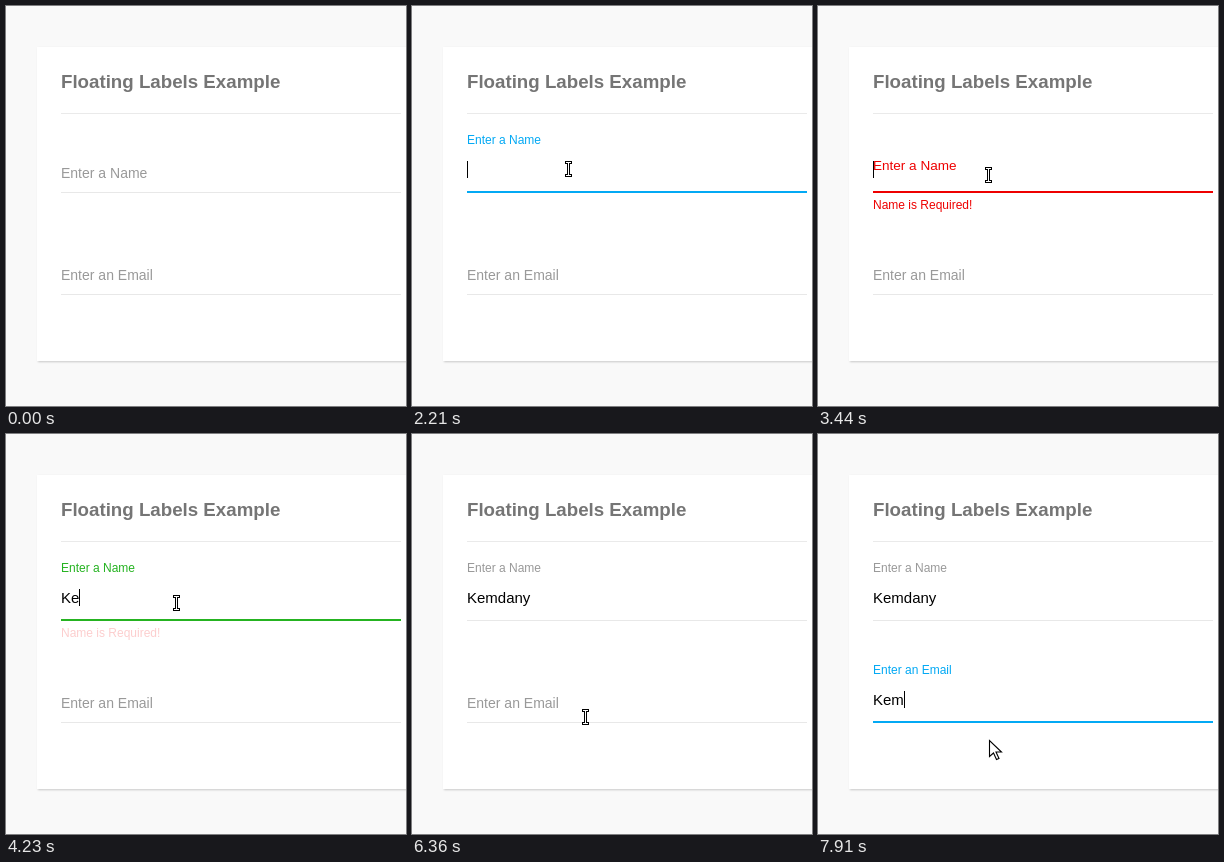
Animation, 400 px wide and 400 px high, one loop 8 s. Source, as an HTML page with a canvas:

```html
<!DOCTYPE html>
<html lang="en">
<head>
<meta charset="utf-8">
<title>Floating labels</title>
<style>
  html, body { margin: 0; width: 100%; height: 100%; overflow: hidden; background: #f9f9f9; }
  canvas { display: block; width: 400px; height: 400px; }
</style>
</head>
<body>
<canvas id="stage" width="400" height="400"></canvas>
<script>
const ctx = document.getElementById('stage').getContext('2d', { alpha: false });
const LOOP = 8000, TRANSITION = 240, BLINK = 550;
const FONT = '"Liberation Sans", Arial, sans-serif';
const LEFT = 55, WIDTH = 340;

const GREY = [153, 153, 153], BLUE = [3, 169, 244], RED = [238, 0, 0], GREEN = [34, 182, 34];

const clamp = v => Math.max(0, Math.min(1, v));
const lerp = (a, b, k) => a + (b - a) * k;
const mix = (from, to, k) => from.map((v, i) => lerp(v, to[i], k));
const rgb = c => `rgb(${c.map(Math.round).join()})`;

// The CSS "ease" curve: cubic-bezier(.25, .1, .25, 1)
function ease(x) {
  let lo = 0, hi = 1, u = x;
  for (let i = 0; i < 16; i++) {
    u = (lo + hi) / 2;
    const bx = 0.75 * u * (1 - u) + u ** 3;
    if (bx < x) lo = u; else hi = u;
  }
  return 0.3 * u * (1 - u) ** 2 + 3 * u * u * (1 - u) + u ** 3;
}

function ramp(t, start, duration = TRANSITION) {
  const k = clamp((t - start) / duration);
  return k === 0 || k === 1 ? k : ease(k);
}

const nameField = {
  y: 0, label: 'Enter a Name', value: 'Kemdany',
  focus: [{ from: 1110, to: 2750 }, { from: 3400, to: 5750 }],
  firstKey: 4030, keyGap: 117
};
const emailField = {
  y: 102, label: 'Enter an Email', value: 'Kem',
  focus: [{ from: 6530, to: Infinity }],
  firstKey: 7430, keyGap: 240
};
const fields = [nameField, emailField];

const [firstVisit, secondVisit] = nameField.focus;
nameField.tints = [
  { at: firstVisit.from, color: BLUE },
  { at: firstVisit.to, color: RED },
  { at: nameField.firstKey, color: GREEN },
  { at: secondVisit.to, color: GREY }
];
emailField.tints = [{ at: emailField.focus[0].from, color: BLUE }];

const pointer = {
  appears: 590,
  origin: [207, 254],
  moves: [
    { at: 590, time: 120, to: [156, 163] },
    { at: 2390, time: 250, to: [165, 221] },
    { at: 2900, time: 540, to: [170, 169] },
    { at: 5350, time: 300, to: [172, 222] },
    { at: 5800, time: 330, to: [173, 283] },
    { at: 6560, time: 210, to: [171, 306] }
  ]
};

function text(str, baseline, size, color, weight = '') {
  ctx.font = `${weight} ${size}px ${FONT}`;
  ctx.fillStyle = color;
  ctx.fillText(str, LEFT, baseline);
}

function rect(color, x, y, w, h) {
  ctx.fillStyle = color;
  ctx.fillRect(x, y, w, h);
}

function drawCard() {
  rect('#f9f9f9', 0, 0, 400, 400);
  ctx.save();
  ctx.shadowColor = 'rgba(0,0,0,0.2)';
  ctx.shadowBlur = 2;
  ctx.shadowOffsetX = 1;
  ctx.shadowOffsetY = 1;
  rect('#fff', 31, 41, 400, 314);
  ctx.restore();
  text('Floating Labels Example', 82, 18.72, '#757575', 'bold');
  rect('#eaeaea', LEFT, 107, WIDTH, 1);
}

const typedCount = (field, t) =>
  Math.min(field.value.length, Math.max(0, Math.floor((t - field.firstKey) / field.keyGap) + 1));

// A label stays up after blur only when the field holds text.
const labelLift = (field, t) => field.focus.reduce((lift, { from, to }) =>
  lift + ramp(t, from) - (to < field.firstKey ? ramp(t, to) : 0), 0);

// The blink restarts on focus and on every key.
function caretVisible(field, t) {
  const visit = field.focus.find(({ from, to }) => t >= from && t < to);
  if (!visit) return false;
  const count = typedCount(field, t);
  const lastKey = count ? field.firstKey + (count - 1) * field.keyGap : 0;
  return (t - Math.max(visit.from, lastKey)) % (2 * BLINK) < BLINK;
}

function drawField(field, t) {
  const { y, focus } = field;
  const lift = labelLift(field, t);
  const tint = rgb(field.tints.reduce((c, { at, color }) => mix(c, color, ramp(t, at)), GREY));

  rect('#e8e8e8', LEFT, 186 + y, WIDTH, 1);
  ctx.globalAlpha = ramp(t, focus[0].from) - ramp(t, focus[focus.length - 1].to);
  rect(tint, LEFT, 185 + y, WIDTH, 2);
  ctx.globalAlpha = 1;

  text(field.label, lerp(172, 138, lift) + y, lerp(14, 12, lift), tint);

  const typed = field.value.slice(0, typedCount(field, t));
  text(typed, 169 + y, 15, '#000');
  if (caretVisible(field, t)) {
    rect('#000', Math.round(LEFT + ctx.measureText(typed).width), 155 + y, 1, 17);
  }
}

function drawError(t) {
  const shown = ramp(t, firstVisit.to + 50, 400);
  const hidden = ramp(t, nameField.firstKey + 50, 300);
  ctx.globalAlpha = clamp(shown - hidden);
  text('Name is Required!', 203, 12, rgb(RED));
  ctx.globalAlpha = 1;
}

function drawBeam(x, y) {
  for (const serif of [y - 8, y + 5]) rect('#000', x - 3, serif, 7, 3);
  rect('#000', x - 1, y - 7, 3, 14);
  for (const serif of [y - 7, y + 6]) rect('#fff', x - 2, serif, 5, 1);
  rect('#fff', x, y - 7, 1, 14);
}

function drawArrow(x, y) {
  ctx.save();
  ctx.translate(x + 0.5, y + 0.5);
  ctx.fillStyle = '#fff';
  ctx.strokeStyle = '#000';
  ctx.lineWidth = 1.1;
  const shape = new Path2D('M0 0V16L4 12.5L7 19L9.5 18L6.5 11.5H12Z');
  ctx.fill(shape);
  ctx.stroke(shape);
  ctx.restore();
}

function drawPointer(t) {
  if (t < pointer.appears) return;
  const [x, y] = pointer.moves
    .reduce((pos, { at, time, to }) => mix(pos, to, ramp(t, at, time)), pointer.origin)
    .map(Math.round);
  const overField = fields.some(f => y >= 142 + f.y && y < 187 + f.y);
  (overField ? drawBeam : drawArrow)(x, y);
}

function draw(t) {
  drawCard();
  fields.forEach(field => drawField(field, t));
  drawError(t);
  drawPointer(t);
}

const start = performance.now();
function tick() {
  draw((performance.now() - start) % LOOP);
  requestAnimationFrame(tick);
}
tick();
</script>
</body>
</html>
```
